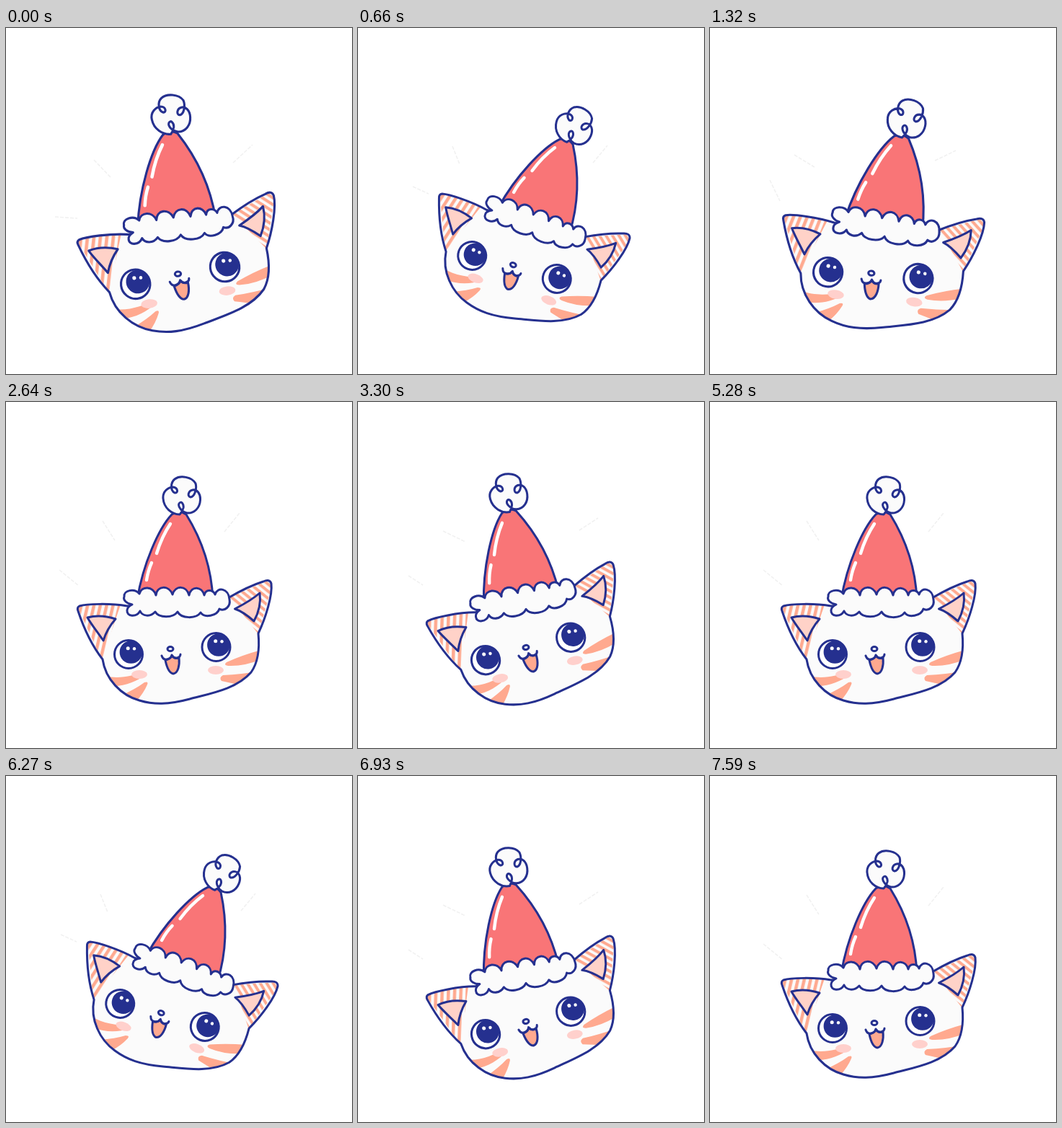
Write an HTML page without scripts that moves like this. It is 480x480 px and loops after 7920 ms.

```html
<!DOCTYPE html>
<html lang="en">
<head>
<meta charset="utf-8">
<title>Cat in a party hat</title>
<style>
  html, body { margin: 0; width: 100%; height: 100%; overflow: hidden; background: #fff; }
  svg { display: block; width: 100%; height: 100%; }

  .ink { stroke: #25308f; stroke-width: 3; stroke-linejoin: round; stroke-linecap: round; }
  .none { fill: none; }
  .fur { fill: #fbfbfb; }
  .white { fill: #fff; }
  .navy { fill: #25308f; }
  .hat { fill: #f97577; }
  .salmon { fill: #ffa98f; }
  .inner { fill: #ffd2c8; }
  .blush { fill: #ffd0cc; }
  .shine { fill: none; stroke: #fff; stroke-width: 4.4; stroke-linecap: round; }
  .marks { fill: none; stroke: #f1f1f1; stroke-width: 1.6; stroke-dasharray: 5 2; }

  /* Five poses sit side by side; the strip jumps from one to the next. */
  .strip { animation: poses 7.92s step-end infinite; }
  @keyframes poses {
    0%, 29.166%, 70.833%, 100% { transform: translateX(0); }
    4.166%, 25%, 33.333%, 50%, 66.666%, 75%, 95.833% { transform: translateX(-480px); }
    16.666%, 83.333% { transform: translateX(-960px); }
    8.333%, 20.833%, 37.5%, 45.833%, 54.166%, 62.5%, 79.166%, 91.666% { transform: translateX(-1440px); }
    12.5%, 41.666%, 58.333%, 87.5% { transform: translateX(-1920px); }
  }
</style>
</head>
<body>
<svg viewBox="0 0 480 480">
  <defs>
    <path id="head" d="M168 283 C145 279 112 280 102 283 Q98 285 100 290 C108 314 120 339 134 357
      C138 385 160 407 185 414 C205 420 225 420 255 412 C285 404 320 398 340 375
      C350 361 352 342 350 321 C360 300 370 268 368 252 Q366 245 357 249 C341 254 325 262 308 272 Z"/>
    <clipPath id="face"><use href="#head"/></clipPath>
    <pattern id="stripesL" width="8.6" height="9" patternUnits="userSpaceOnUse" patternTransform="translate(118 281) rotate(13)">
      <path class="salmon" d="M2 0 h4.4 v9 h-4.4 Z"/>
    </pattern>
    <pattern id="stripesR" width="9" height="7.7" patternUnits="userSpaceOnUse" patternTransform="translate(352 258) rotate(39)">
      <path class="salmon" d="M0 2 h9 v4 h-9 Z"/>
    </pattern>

    <g id="eye">
      <circle class="ink white" r="19.5"/>
      <circle class="navy" cx="3.4" cy="-3" r="15.8"/>
      <circle class="white" cx="-.8" cy="-8.3" r="2.5"/>
      <circle class="white" cx="8" cy="-7.8" r="2.2"/>
    </g>

    <g id="cat">
      <use href="#head" class="fur"/>
      <g clip-path="url(#face)">
        <path fill="url(#stripesL)" d="M97 280 L160 278 L133 358 Z"/>
        <path fill="url(#stripesR)" d="M372 244 L310 271 L350 322 Z"/>
        <path class="salmon" d="M138 380 C157 385 177 379 192 375 Q198 375 193 379 C182 387 165 395 146 394 Z
          M160 407 Q180 398 192 389 Q198 387 196 392 Q191 404 180 416 Z
          M354 344 Q328 351 306 361 Q301 365 308 366 Q330 367 354 357 Z
          M301 379 Q326 378 354 373 L332 394 Q312 390 299 387 Q295 382 301 379 Z"/>
      </g>
      <path class="ink inner" d="M113 299 Q131 294 152 301 C145 309 139 318 135 331 C126 318 118 308 113 299 Z
        M317.5 287 C331 280 343 273 352 265 C354 280 350 293 344 304 C336 297 327 290 317.5 287 Z"/>
      <use href="#head" class="ink none"/>

      <ellipse class="blush" cx="185" cy="378" rx="11" ry="6"/>
      <ellipse class="blush" cx="291" cy="372" rx="11" ry="6"/>
      <use href="#eye" x="170" y="350"/>
      <use href="#eye" x="291.5" y="340"/>
      <ellipse class="ink white" cx="228" cy="342.5" rx="4" ry="3"/>
      <path class="ink salmon" d="M221 358 C223 368 227 376 232 377 C239 376 241 365 240 355 Q234 357 230 352 Q228 357 221 358 Z"/>
      <path class="ink none" d="M216 352 Q218 358 223 357 Q229 356 230 351 Q233 356 237 355 Q242 354 242 350"/>

      <path class="ink hat" d="M182 274 C190 225 212 175 230 156 Q240 149 250 156 C268 185 285 225 287 274 Z"/>
      <path class="shine" d="M228 169 Q216 187 209 210 M202 223 Q197 234 195 247"/>
      <path class="ink fur" d="M164 270 C163 261 178 258 185 266 C188 255 204 255 208 268 C210 254 226 254 231 267
        C235 254 250 254 254 268 C257 254 272 256 275 268 C277 259 287 260 290 267 C293 256 309 258 310 274
        C312 284 303 291 296 287 C293 297 275 300 270 292 C264 301 243 301 238 291 C232 300 212 300 207 291
        C200 299 189 297 186 290 C181 299 167 298 168 289 C168 285 171 283 175 281 C168 280 162 275 164 270 Z"/>
      <path class="ink fur" d="M241 156 C230 156 219 147 218 134 C217 124 225 118 232 118 C239 119 239 127 234 126
        C228 123 228 112 234 107 C242 101 258 104 263 113 C265 120 262 131 256 132 C251 131 253 123 259 122
        C265 121 270 127 269.5 136 C269 147 261 155 251 154 C245 153 238 146 240 141 C243 136 247 142 246 147
        C245 151 243 154 241 156 Z"/>
    </g>
  </defs>

  <g class="strip">
    <g>
      <path class="marks" d="M122 183 L145 207 M315 187 L342 162 M68 262 L99 264"/>
      <use href="#cat" transform="matrix(1.029 -.111 .124 1.032 -38.6 13)"/>
    </g>
    <g transform="translate(480)">
      <path class="marks" d="M134 165 L151 192 M303 180 L324 154 M74 233 L101 255"/>
      <use href="#cat"/>
    </g>
    <g transform="translate(960)">
      <path class="marks" d="M117 176 L145 193 M312 184 L341 170 M83 211 L97 240"/>
      <use href="#cat" transform="matrix(1.018 .157 -.157 1.02 45.5 -45)"/>
    </g>
    <g transform="translate(1440)">
      <path class="marks" d="M131 164 L141 189 M326 187 L346 163 M76 220 L98 230"/>
      <use href="#cat" transform="matrix(.94 .341 -.333 .937 115 -70)"/>
    </g>
    <g transform="translate(1920)">
      <path class="marks" d="M118 179 L149 194 M307 178 L333 161 M70 241 L90 254"/>
      <use href="#cat" transform="matrix(.988 -.177 .19 .995 -57.4 40)"/>
    </g>
  </g>
</svg>
</body>
</html>
```
